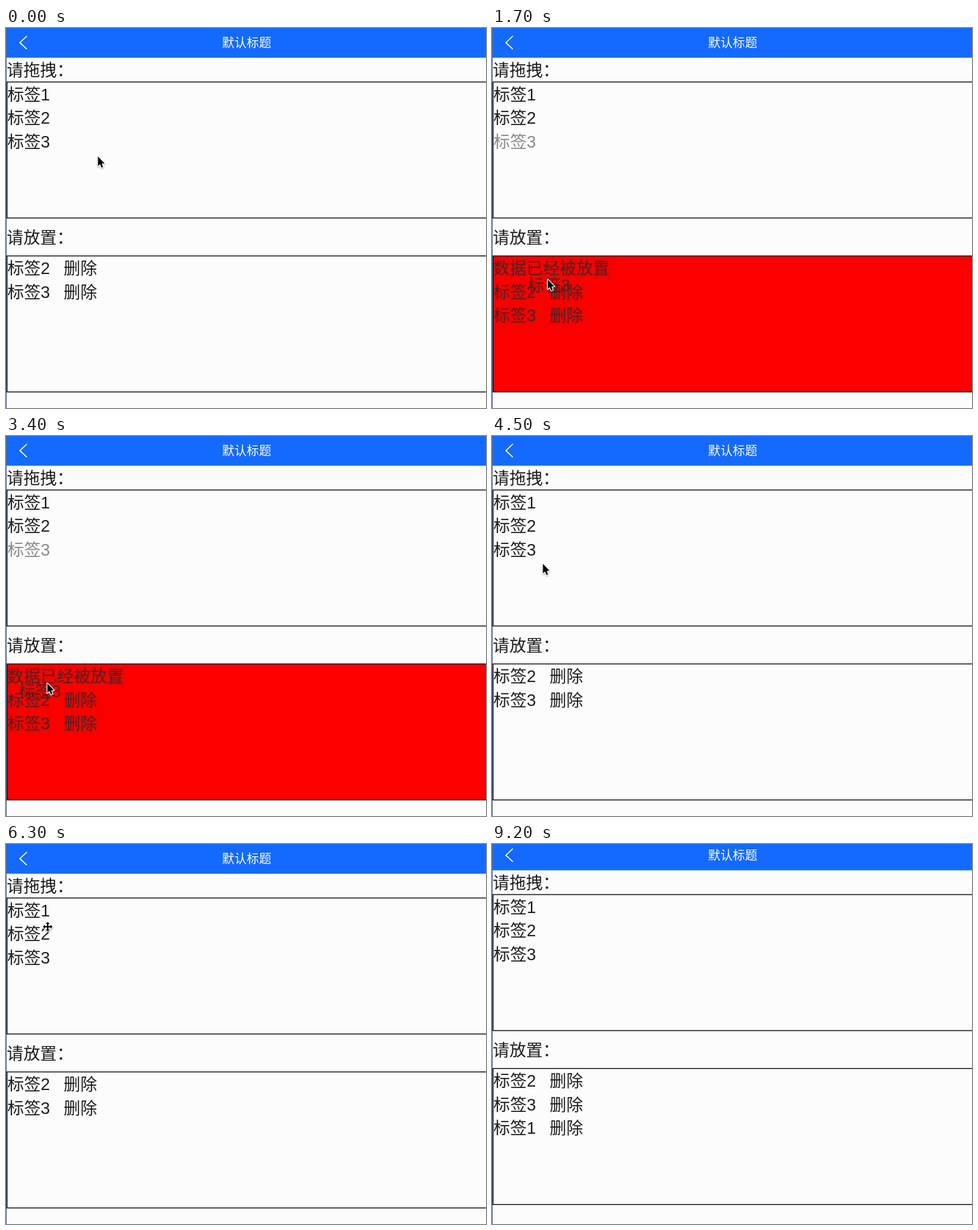
An HTML page with a canvas that plays this animation: 702x556 px, repeating every 9.3 s.

```html
<!DOCTYPE html>
<html lang="zh-CN">
<head>
<meta charset="utf-8">
<style>
  html, body { margin: 0; width: 100%; height: 100%; overflow: hidden; background: #fcfcfc; }
  canvas { display: block; }
</style>
</head>
<body>
<canvas id="stage" width="702" height="556"></canvas>
<script>
const ctx = document.getElementById('stage').getContext('2d');
const LOOP = 9300, STEP = 100;
const FAMILY = '"Liberation Sans", "Noto Sans CJK SC", "Noto Sans CJK", sans-serif';
const INK = '#1c1c1c', PAPER = '#fcfcfc';
const ROW = 34.5, TOP_ROW = 97, DROP_ROW = 351.5;

// Every drag follows the same rhythm, measured from the moment of the grab
const FIRST = 1300, PERIOD = 1750, ENTER = 300, OVER = 350, RELEASE = 700;
const REST_FROM = -300, REST_TO = -250;
const SCROLL_AT = 7700, EXIT = 8200, GONE = 8400;

const drags = [
  { label: 3, rest: [70, 185], grab: [31, 158], over: [81, 368] },
  { label: 3, rest: [60, 185], grab: [44, 155], over: [60, 362] },
  { label: 2, rest: [74, 187], grab: [45, 128], over: [48, 345] },
  { label: 1, rest: [61, 121], grab: [45, 92], over: [56, 364] }
];
drags.forEach((d, i) => d.start = FIRST + i * PERIOD);
const last = drags[drags.length - 1];

const path = [
  { t: 0, at: [134, 188] },
  ...drags.flatMap(d => [
    { t: d.start + REST_FROM, at: d.rest },
    { t: d.start + REST_TO, at: d.rest },
    { t: d.start, at: d.grab },
    { t: d.start + OVER, at: d.over },
    { t: d.start + RELEASE, at: d.over }
  ]),
  { t: EXIT, at: [598, 3] },
  { t: GONE, at: [598, 3] }
];

const rowY = label => TOP_ROW + (label - 1) * ROW;
const ease = u => u * u * (3 - 2 * u);

function pointerAt(t) {
  const i = path.findIndex(key => key.t > t);
  if (i < 0) return null;
  const a = path[i - 1], b = path[i];
  const u = ease((t - a.t) / (b.t - a.t));
  return a.at.map((v, k) => v + (b.at[k] - v) * u);
}

function text(str, x, middle, color = INK, size = 24.4) {
  ctx.font = '300 ' + size + 'px ' + FAMILY;
  ctx.fillStyle = color;
  ctx.fillText(str, x, middle + size * 0.35);
}

function polygon(points) {
  ctx.beginPath();
  points.forEach(([x, y]) => ctx.lineTo(x, y));
  ctx.closePath();
}

function box(y, fill) {
  ctx.fillStyle = fill;
  ctx.fillRect(1, y, 701, 199);
  ctx.strokeStyle = '#080a10';
  ctx.lineWidth = 1.3;
  ctx.strokeRect(1.5, y, 720, 199);
}

function header() {
  ctx.fillStyle = '#146afe';
  ctx.fillRect(0, -10, 702, 53.5);
  ctx.strokeStyle = '#fff';
  ctx.lineWidth = 1.5;
  ctx.beginPath();
  ctx.moveTo(30.5, 11.7);
  ctx.lineTo(20.3, 21.4);
  ctx.lineTo(30.5, 31);
  ctx.stroke();
  text('默认标题', 316, 22, '#fff', 18);
}

function dropRows(labels, refused) {
  const color = refused ? 'rgba(40,40,40,.7)' : INK;
  let y = DROP_ROW;
  ctx.save();
  if (refused) {
    ctx.shadowColor = 'rgba(50,50,50,.5)';
    ctx.shadowBlur = 3;
    text('数据已经被放置', 1.5, y, color);
    y += ROW;
  }
  labels.forEach((n, i) => {
    text('标签' + n, 2, y + i * ROW, color);
    text('删除', 84.3, y + i * ROW, color);
  });
  ctx.restore();
}

function outlined() {
  ctx.save();
  ctx.shadowColor = 'rgba(0,0,0,.35)';
  ctx.shadowBlur = 2;
  ctx.shadowOffsetY = 1;
  ctx.strokeStyle = '#fff';
  ctx.lineWidth = 2.4;
  ctx.lineJoin = 'round';
  ctx.stroke();
  ctx.restore();
  ctx.fillStyle = '#000';
  ctx.fill();
}

function arrowCursor() {
  polygon([[0.5, 0], [0.5, 14], [3.6, 11.2], [5.8, 16.2], [8, 15.2], [5.9, 10.4], [10, 10]]);
  outlined();
}

function moveCursor() {
  const arm = [[-1, -1], [-1, -4], [-3, -4], [0, -7], [3, -4], [1, -4]];
  const points = [];
  for (let turn = 0; turn < 4; turn++) {
    const c = Math.cos(turn * Math.PI / 2), s = Math.sin(turn * Math.PI / 2);
    arm.forEach(([x, y]) => points.push([x * c - y * s, x * s + y * c]));
  }
  polygon(points);
  outlined();
}

function page(drag, refused, placed) {
  header();
  text('请拖拽：', 1, 61.8);
  box(79, PAPER);
  for (let n = 1; n <= 3; n++) {
    text('标签' + n, 2, rowY(n), drag && drag.label === n ? '#8a8a8a' : INK);
  }
  text('请放置：', 1, 306);
  box(333.5, refused ? '#fc0000' : PAPER);
  dropRows(placed, refused);
}

function draw(t) {
  const drag = drags.find(d => t >= d.start && t < d.start + RELEASE);
  // Labels 2 and 3 are already in the box, so only label 1 is accepted
  const refused = !!drag && drag !== last && t >= drag.start + ENTER;
  const placed = t >= last.start + RELEASE ? [2, 3, 1] : [2, 3];

  ctx.fillStyle = PAPER;
  ctx.fillRect(0, 0, 702, 556);
  ctx.save();
  if (t >= SCROLL_AT) ctx.translate(0, -5);
  page(drag, refused, placed);
  ctx.restore();

  ctx.fillStyle = '#5a6a8c';
  ctx.fillRect(0, 0, 1, 556);

  const pointer = pointerAt(t);
  if (!pointer) return;
  const [x, y] = pointer;
  if (drag) {
    const [gx, gy] = drag.grab;
    ctx.save();
    ctx.shadowColor = 'rgba(50,50,50,.4)';
    ctx.shadowBlur = 2;
    text('标签' + drag.label, 2 + x - gx, rowY(drag.label) + y - gy, 'rgba(40,40,40,.65)');
    ctx.restore();
  }
  const onLabel = !drag && x < 65 && y > 80 && y < 183;
  ctx.save();
  ctx.translate(x, y);
  if (onLabel) moveCursor(); else arrowCursor();
  ctx.restore();
}

const begin = performance.now();
function tick() {
  const t = (performance.now() - begin) % LOOP;
  draw(Math.floor(t / STEP) * STEP);
  requestAnimationFrame(tick);
}
tick();
</script>
</body>
</html>
```
